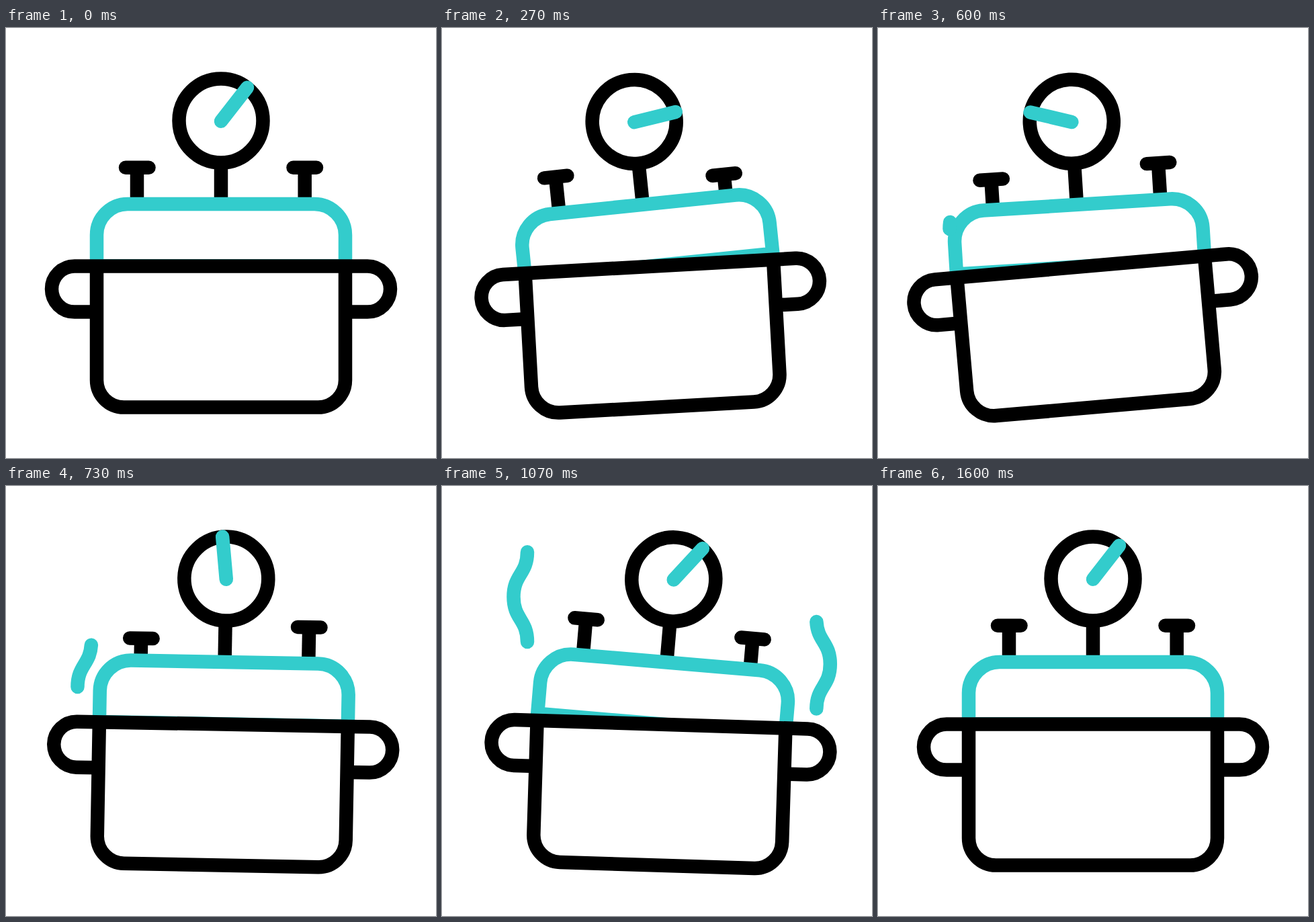
An HTML page for the animation above (1.67 s loop, 640 px wide and 640 px high).

```html
<!DOCTYPE html>
<html lang="en">
<head>
<meta charset="utf-8">
<title>Pressure cooker</title>
<style>
  html, body { margin: 0; height: 100%; overflow: hidden; background: #fff; }
  svg { display: block; width: 100vw; height: 100vh; }
  path, circle { fill: none; stroke: #000; stroke-width: 20.5; }
  .teal { stroke: #3cc; }
  .solid { fill: #fff; }
  .round { stroke-linecap: round; }
</style>
</head>
<body>
<svg viewBox="0 0 640 640">
  <g id="cooker">
    <g id="lid">
      <g id="leftValve">
        <path d="M195 207.5V262"/>
        <path class="round" d="M178 207.7H212.5"/>
      </g>
      <g id="rightValve">
        <path d="M444.7 207.5V262"/>
        <path class="round" d="M427.5 207.7H462"/>
      </g>
      <path d="M320 200V262"/>
      <path class="teal solid" d="M135 354.3V308A46 46 0 0 1 181 262H459A46 46 0 0 1 505 308V354.3Z"/>
      <circle cx="320" cy="138" r="62.5"/>
      <path id="needle" class="teal round" d="M320 138.7L359 88.7"/>
    </g>
    <path class="solid" d="M135 354.6V524A40.5 40.5 0 0 0 175.500 564.500H464.500A40.5 40.5 0 0 0 505 524V354.6"/>
    <path d="M135 422.600H102A34 34 0 0 1 102 354.600H538A34 34 0 0 1 538 422.600H505"/>
  </g>
  <path id="leftSteam" class="teal round" pathLength="1"
    d="M106.500 299c0-33.500 20.500-33.500 20.500-67s-20.500-33.500-20.500-67 20.500-33.500 20.500-67"/>
  <path id="rightSteam" class="teal round" pathLength="1"
    d="M557.300 332c0-33.500 20.500-33.500 20.500-67s-20.500-33.500-20.500-67 20.500-33.500 20.500-67"/>
</svg>
<script>
const LOOP = 1670, STEP = 100 / 3, LAST = 48;
const $ = id => document.getElementById(id);

// cubic-bezier(.5, 0, .5, 1)
function ease(x) {
  if (x <= 0) return 0;
  if (x >= 1) return 1;
  let lo = 0, hi = 1;
  for (let i = 0; i < 24; i++) {
    const s = (lo + hi) / 2;
    if (1.5 * s * (1 - s) + s ** 3 < x) lo = s; else hi = s;
  }
  return lo * lo * (3 - 2 * lo);
}

// Eased value at time n from [time, value] keys
function track(n, ...keys) {
  let value = keys[0][1];
  for (let i = 1; i < keys.length; i++) {
    const [t0, v0] = keys[i - 1], [t1, v1] = keys[i];
    if (n >= t0) value = v0 + (v1 - v0) * ease((n - t0) / (t1 - t0));
  }
  return value;
}

const rotate = (id, angle, x, y) => $(id).setAttribute('transform', `rotate(${angle} ${x} ${y})`);
const lower = (id, dy) => $(id).setAttribute('transform', `translate(0 ${dy})`);

// Visible part of a steam path, between its tail and its head
function trim(id, n, headStart, tailStart, duration) {
  const head = ease((n - headStart) / duration);
  const tail = ease((n - tailStart) / duration);
  const style = $(id).style;
  style.visibility = head - tail > 0.002 ? 'visible' : 'hidden';
  style.strokeDasharray = `${head - tail} 2`;
  style.strokeDashoffset = -tail;
}

function draw(time) {
  const n = Math.min(LAST, Math.floor((time % LOOP + 4) / STEP));
  rotate('cooker', track(n, [0.5, 0], [15.2, -6.1], [26, 3.55], [38, 0]), 320, 565);
  rotate('lid', track(n, [0, 0], [8, -2.7], [15, 2.25], [22, 0], [29, 4.8], [36, 0]), 320, 354.5);
  rotate('needle', track(n, [0, 0], [30, 360]), 320, 138.7);
  lower('leftValve', track(n, [15, 0], [21.5, 21.5], [28, 0]));
  lower('rightValve', track(n, [0, 0], [9, 22.5], [17.5, 0], [21.5, 0], [28, 22.5], [35, 0]));
  trim('leftSteam', n, 15, 24.8, 17.4);
  trim('rightSteam', n, 22.2, 31.4, 17);
}

const start = performance.now();
function tick() {
  draw(performance.now() - start);
  requestAnimationFrame(tick);
}
tick();
</script>
</body>
</html>
```
